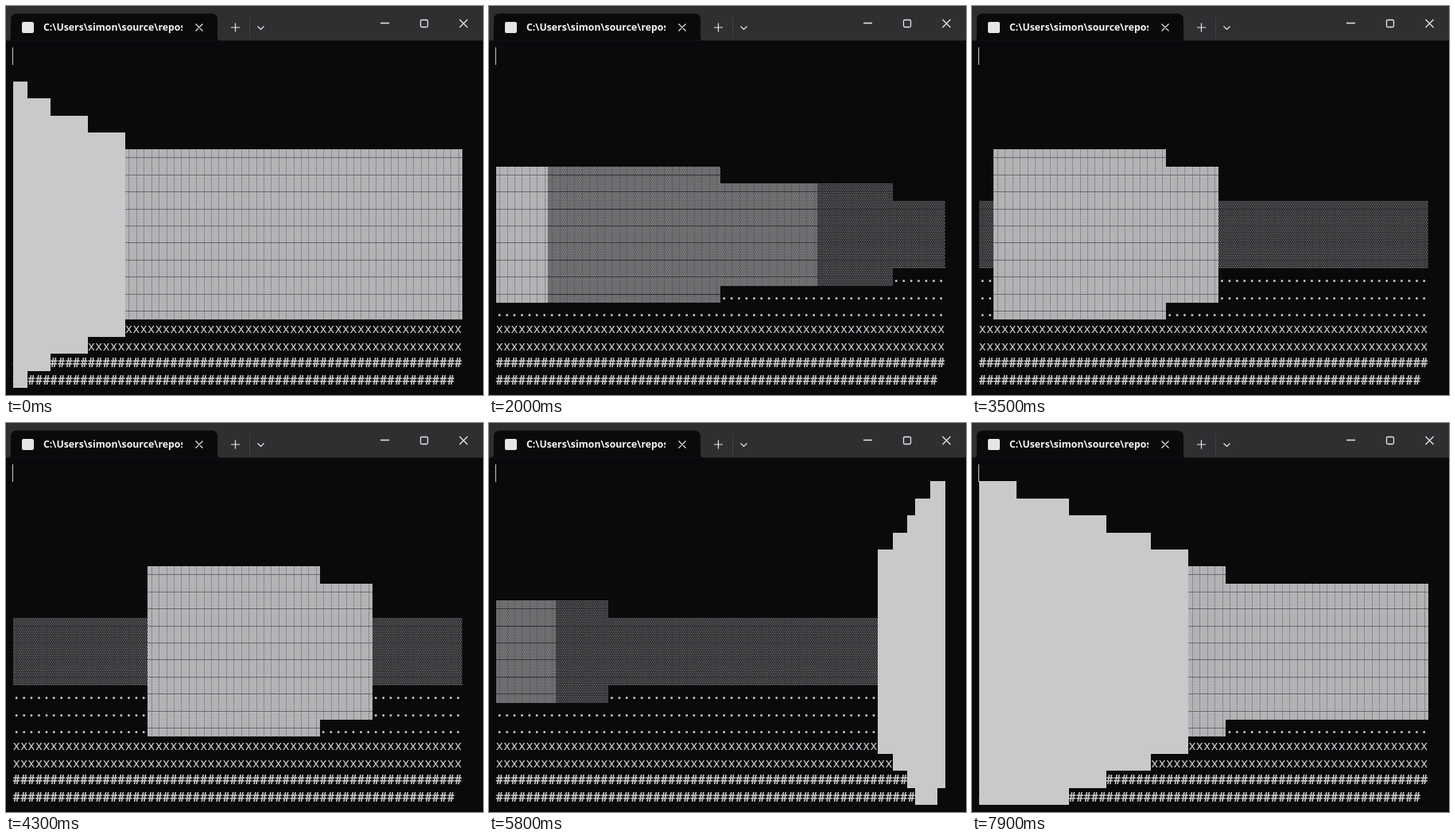
Animation of 600 by 489 pixels, one loop 8000 ms. Source, as an HTML page with a canvas:

```html
<!DOCTYPE html>
<html lang="en">
<head>
<meta charset="utf-8">
<title>Terminal ray caster</title>
<style>
html, body { margin: 0; width: 100%; height: 100%; overflow: hidden; background: #0b090c; }
#win { position: relative; width: 600px; height: 489px; overflow: hidden; background: #0b090c; }
#win > * { position: absolute; left: 0; top: 0; }
.title {
  left: 47px !important; top: 17px !important; width: 175px; height: 20px; overflow: hidden;
  font: 600 12.3px/20px "Noto Sans", "Open Sans", sans-serif; color: #f4f3f5; white-space: nowrap;
}
</style>
</head>
<body>
<div id="win">
  <canvas id="view" width="600" height="489"></canvas>
  <svg width="600" height="44" fill="none" stroke="#e6e5e8" stroke-width="1.2">
    <path d="M0 0H600V43.5H0Z" fill="#302e31" stroke="none"/>
    <path d="M2 43.6Q6 43.6 6 39V17Q6 9.5 13.5 9.5H258.500Q266 9.500 266 17V39Q266 43.6 270 43.600Z" fill="#0b090c" stroke="none"/>
    <rect x="20" y="20" width="15" height="14" rx="2" fill="#e6e5e8" stroke="none"/>
    <path d="M238.500 22.500l9 9m0-9l-9 9M283 27h11m-5.500-5.500v11M316.500 25.500l4 4 4-4"/>
    <path d="M306.500 14v27" stroke="#434145" stroke-width="1"/>
    <path d="M471 21.500h11M570.500 17l10 10m0-10l-10 10" stroke-width="1.3"/>
    <rect x="521.500" y="17.500" width="9" height="9" rx="1.500" stroke-width="1.3"/>
  </svg>
  <div class="title">C:\Users\simon\source\repos\</div>
</div>
<script>
const COLS = 60, ROWS = 20, LEFT = 8.5, TOP = 52, CW = 565 / COLS, CH = 21.4;
const INK = '#cac8cb', BG = '#0b090c', LOOP = 8000, STEP = 100, DEG_PER_COL = 0.75;
const ctx = document.getElementById('view').getContext('2d');
const colX = c => Math.round(LEFT + c * CW);
const rowY = r => Math.round(TOP + r * CH);

// Column at which the north direction would fall, over time.
const TURN = [
  [900, 34.8], [1000, 31], [1100, 31], [1200, 23.5], [1300, 18], [1400, 18],
  [1500, 7], [1600, -4], [1700, -4], [2000, -29.6], [2900, -76.65],
  [3600, -113], [3900, -113], [4300, -91.7], [4800, -62], [4900, -59.5],
  [5400, -59.5], [5800, -77.5], [5900, -80.5], [6100, -90.5], [6400, -90.5],
  [7000, -59], [7700, -59], [7900, -67]
];
// Walker position: time, x, y.
const WALK = [
  [5000, 1.067, 5.28], [5550, 3.97, 6.43], [6950, 3.97, 6.43],
  [7100, 4.75, 6.835], [7900, 8.95, 8.702]
];
const ROOM = [0, 14, -4, 10], BLOCK = [6, 8, 4, 6];

function sample(track, t, k = 1) {
  const i = track.findIndex(p => p[0] >= t);
  if (i < 0) return track[track.length - 1][k];
  if (i === 0) return track[0][k];
  const a = track[i - 1], b = track[i];
  return a[k] + (b[k] - a[k]) * (t - a[0]) / (b[0] - a[0]);
}

// Entry and exit distance of a ray through a box.
function slab([x0, x1, y0, y1], px, py, dx, dy) {
  const span = (lo, hi, p, d) => [(lo - p) / d, (hi - p) / d].sort((a, b) => a - b);
  const h = span(x0, x1, px, dx || 1e-9), v = span(y0, y1, py, dy || 1e-9);
  return [Math.max(h[0], v[0]), Math.min(h[1], v[1])];
}

function cast(px, py, angle) {
  const dx = Math.sin(angle), dy = Math.cos(angle);
  const [near, far] = slab(BLOCK, px, py, dx, dy);
  const d = near > 0 && near < far ? near : slab(ROOM, px, py, dx, dy)[1];
  return Math.ceil(d * 10) / 10 - 1e-4;
}

function layer(paint) {
  const c = document.createElement('canvas');
  c.width = 600;
  c.height = 489;
  paint(c.getContext('2d'));
  return c;
}

// Shade texture: a base colour, staggered dots and thin mid-cell rules.
function shade(base, dot, across, down) {
  return layer(g => {
    g.fillStyle = base;
    g.fillRect(0, TOP, 600, 437);
    g.fillStyle = dot;
    const w = CW / 4, h = CH / 10;
    for (let r = 0; r < ROWS * 10; r++)
      for (let c = 0; c < COLS * 4; c++)
        g.fillRect(LEFT + (c + r % 2 / 2) * w, TOP + r * h, w / 2, h / 2);
    g.fillStyle = across;
    for (let r = 0; r < ROWS; r++) g.fillRect(0, Math.round(TOP + r * CH + 10), 600, 1);
    g.fillStyle = down;
    for (let c = 0; c < COLS; c++)
      for (let y = TOP; y < 481; y += 2) g.fillRect(Math.round(LEFT + (c + 0.5) * CW), y, 1, 1);
  });
}

const solid = layer(g => {
  g.fillStyle = INK;
  g.fillRect(0, 0, 600, 489);
});
const shades = [
  solid,
  shade('#bbb9bc', '#a09ea1', 'rgba(40,38,42,.5)', 'rgba(40,38,42,.55)'),
  shade('#5c5a5d', '#a8a6a9', 'rgba(11,9,12,.6)', 'rgba(11,9,12,.3)'),
  shade('#211f22', '#a3a1a4', 'rgba(11,9,12,.25)', 'rgba(11,9,12,.2)')
];

const backdrop = layer(g => {
  g.fillStyle = BG;
  g.fillRect(0, 0, 600, 489);
  g.fillStyle = INK;
  g.textAlign = 'center';
  for (let r = 13; r < ROWS; r++) {
    const ch = r > 17 ? '#' : r > 15 ? 'x' : '.';
    g.font = (ch === 'x' ? 500 : 700) + ' 15.7px "Noto Sans Mono", "DejaVu Sans Mono", monospace';
    const count = r === ROWS - 1 ? COLS - 1 : COLS;
    for (let c = 0; c < count; c++) g.fillText(ch, LEFT + (c + 0.5) * CW, TOP + r * CH + 17);
  }
  g.fillRect(8, TOP, 1, 22);
});

function draw(t) {
  const north = sample(TURN, t), px = sample(WALK, t, 1), py = sample(WALK, t, 2);
  ctx.drawImage(backdrop, 0, 0);
  for (let c = 0; c < COLS; c++) {
    const d = cast(px, py, (c - north) * DEG_PER_COL * Math.PI / 180);
    if (d >= 16) continue;
    const ceiling = Math.trunc(ROWS / 2 - ROWS / d);
    const last = Math.min(ROWS - ceiling, c === COLS - 1 ? ROWS - 2 : ROWS - 1);
    const tone = d <= 4 ? 0 : d < 16 / 3 ? 1 : d < 8 ? 2 : 3;
    const x = colX(c), y = rowY(ceiling + 1), w = colX(c + 1) - x, h = rowY(last + 1) - y;
    ctx.drawImage(shades[tone], x, y, w, h, x, y, w, h);
  }
}

let shown = -1;
const start = performance.now();
function tick() {
  const step = Math.floor((performance.now() - start) % LOOP / STEP);
  if (step !== shown) draw((shown = step) * STEP);
  requestAnimationFrame(tick);
}
tick();
</script>
</body>
</html>
```
